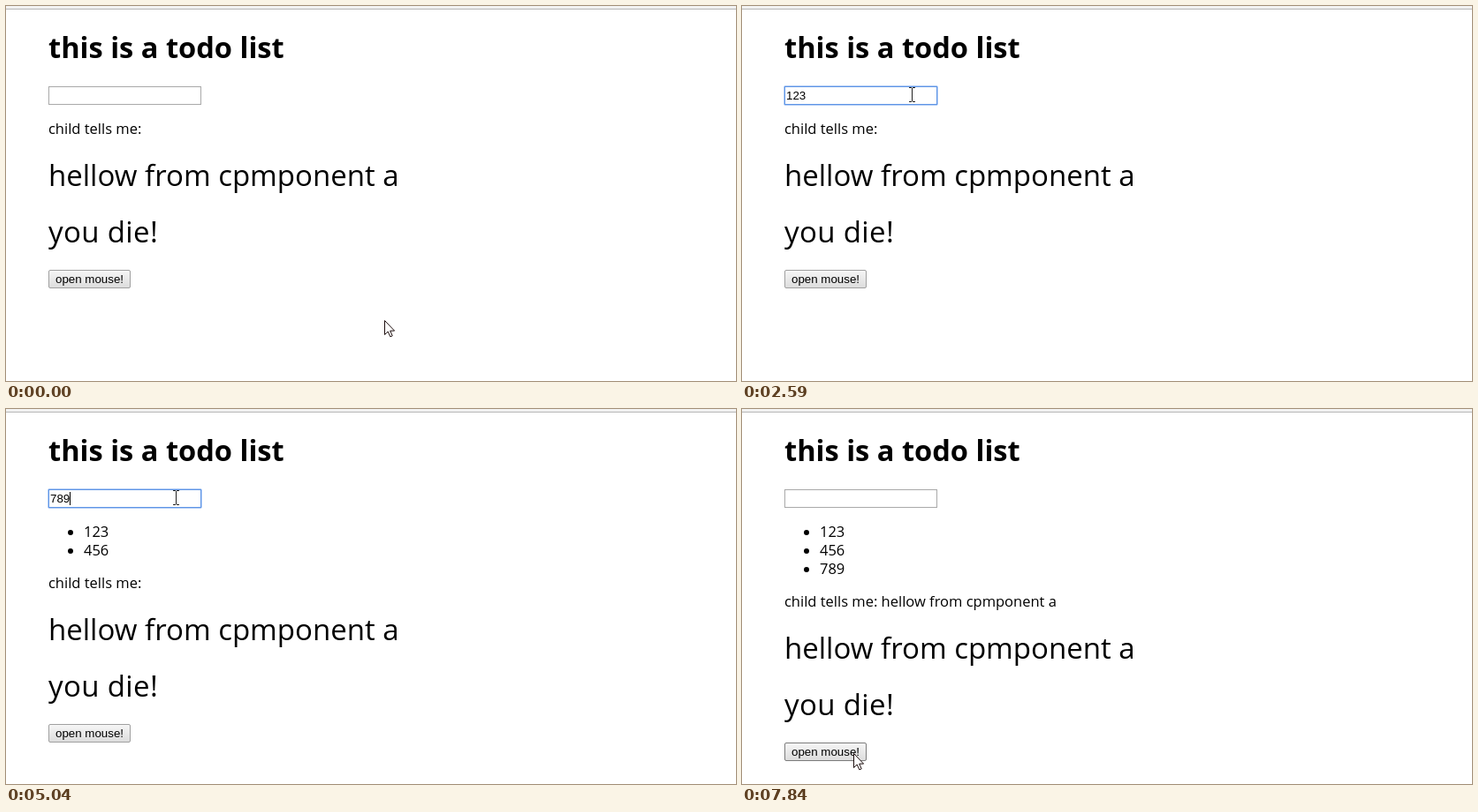
Recreate the animation shown at these times as an HTML page. Size 826 by 425 pixels, loop 8000 ms.

```html
<!DOCTYPE html>
<html lang="en">
<head>
<meta charset="utf-8">
<title>Todo list</title>
<style>
  html, body { margin: 0; width: 100%; height: 100%; overflow: hidden; background: #fff; }
  svg { display: block; }
  text { white-space: pre; }
  .page { font: 16.5px "Open Sans", "Noto Sans", sans-serif; }
  .title { font-size: 32.6px; font-weight: 700; }
  .big { font-size: 33px; }
  .die { letter-spacing: .35px; }
  .ui { font: 13.333px "Liberation Sans", Arial, sans-serif; }
</style>
</head>
<body>
<svg width="826" height="425" viewBox="0 0 826 425">
  <defs>
    <linearGradient id="face" x2="0" y2="1">
      <stop stop-color="#f6f6f6"/><stop offset="1" stop-color="#dcdcdc"/>
    </linearGradient>
    <linearGradient id="pressed" x2="0" y2="1">
      <stop stop-color="#dcdcdc"/><stop offset="1" stop-color="#f2f2f2"/>
    </linearGradient>
  </defs>
  <rect width="826" height="3" fill="#f2f2f2"/>
  <rect y="3" width="826" height="1" fill="#b6b6b6"/>

  <g class="page">
    <text class="title" x="48" y="59">this is a todo list</text>
    <g class="item"><circle cx="73" cy="140" r="3"/><text x="88" y="145">123</text></g>
    <g class="item"><circle cx="73" cy="161" r="3"/><text x="88" y="166">456</text></g>
    <g class="item"><circle cx="73" cy="182" r="3"/><text x="88" y="187">789</text></g>
  </g>

  <rect id="border" x="48.5" y="91.5" width="172" height="20" fill="#fff" stroke="#a9a9a9"/>
  <g id="ring" fill="none">
    <rect x="47.5" y="90.5" width="174" height="22" rx="1.5" stroke="#b3cdf5"/>
    <rect x="48.5" y="91.5" width="172" height="20" stroke="#5e95e6"/>
  </g>
  <text id="typed" class="ui" x="50" y="106"></text>
  <rect id="caret" y="94" width="1" height="15"/>

  <g id="below">
    <g class="page">
      <text x="48" y="145">child tells me: <tspan id="message">hellow from cpmponent a</tspan></text>
      <text class="big" x="48" y="204">hellow from cpmponent a</text>
      <text class="big die" x="48" y="268">you die!</text>
    </g>
    <rect id="button" x="48.5" y="299.5" width="92" height="20" rx="1.5"/>
    <text class="ui" x="56" y="314">open mouse!</text>
  </g>

  <g id="cursor">
    <path id="arrow" d="M.5 .5V16.5L4.2 13L6.8 18.8L9.2 17.8L6.7 12.1H11.6Z" fill="#fff" stroke="#1c0d0d"/>
    <path id="beam" d="M-3 -7.5H0M1 -7.5H4M-3 8.5H0M1 8.5H4M.5 -7V8" fill="none" stroke="#222"/>
  </g>
</svg>
<script>
const LOOP = 8000, STEP = 70;
const $ = id => document.getElementById(id);
const show = (el, on) => el.setAttribute('visibility', on ? 'visible' : 'hidden');
const items = document.querySelectorAll('.item');

// [time, input text, caret visible]
const typing = [
  [0, '', 0], [840, '', 1], [1330, '', 0], [1820, '', 1],
  [1960, '12', 1], [2100, '123', 1], [2590, '123', 0],
  [2870, '', 1], [3360, '', 0],
  [3640, '4', 1], [3780, '45', 1], [3920, '456', 1],
  [4410, '', 1], [4690, '7', 1], [4830, '78', 1], [5040, '789', 1],
  [5530, '', 1], [6020, '', 0], [6510, '', 1], [7000, '', 0],
  [7420, '', 1], [7700, '', 0]
];
const caretX = [50, 57, 65, 72];
const submits = [2870, 4410, 5530];
const offsets = [0, 37, 58, 79];

// [time, x, y] of the pointer
const path = [
  [0, 428, 356], [70, 424, 350], [210, 365, 280], [350, 285, 195],
  [490, 222, 122], [630, 197, 104], [770, 192, 100],
  [6370, 192, 100], [6440, 196, 105], [6510, 198, 120], [6650, 190, 175],
  [6790, 165, 265], [6930, 137, 340], [7000, 132, 359], [7070, 130, 371],
  [7210, 133, 391], [7280, 132, 391], [7420, 126, 390], [LOOP, 126, 390]
];

function pointer(t) {
  const i = path.findIndex(p => p[0] > t);
  const [t0, x0, y0] = path[i - 1], [t1, x1, y1] = path[i];
  const k = (t - t0) / (t1 - t0);
  return [Math.round(x0 + (x1 - x0) * k), Math.round(y0 + (y1 - y0) * k)];
}

function overText(x, y, dy) {
  const inside = (right, top, bottom) => x >= 48 && x < right && y >= top && y < bottom;
  return inside(221, 91, 112) || inside(154, 129 + dy, 150 + dy) ||
    inside(446, 170 + dy, 214 + dy) || inside(172, 234 + dy, 281 + dy);
}

function draw(t) {
  const [, text, caret] = typing.filter(s => s[0] <= t).pop();
  $('typed').textContent = text;
  $('caret').setAttribute('x', caretX[text.length]);
  show($('caret'), caret);
  show($('ring'), t >= 840 && t < 7700);

  const count = submits.filter(s => s <= t).length, dy = offsets[count];
  items.forEach((el, i) => show(el, i < count));
  $('below').setAttribute('transform', `translate(0 ${dy})`);
  show($('message'), t >= 7840);

  const [x, y] = pointer(Math.floor(t / STEP) * STEP);
  const beam = overText(x, y, dy);
  $('cursor').setAttribute('transform', `translate(${x} ${y})`);
  show($('beam'), beam);
  show($('arrow'), !beam);

  const hover = x >= 48 && x < 141 && y >= 299 + dy && y < 320 + dy;
  const down = t >= 7700 && t < 7840;
  $('button').setAttribute('fill', `url(#${down ? 'pressed' : 'face'})`);
  $('button').setAttribute('stroke', hover ? '#7c7c7c' : '#a0a0a0');
}

const start = performance.now();
function tick() {
  draw((performance.now() - start) % LOOP);
  requestAnimationFrame(tick);
}
tick();
</script>
</body>
</html>
```
